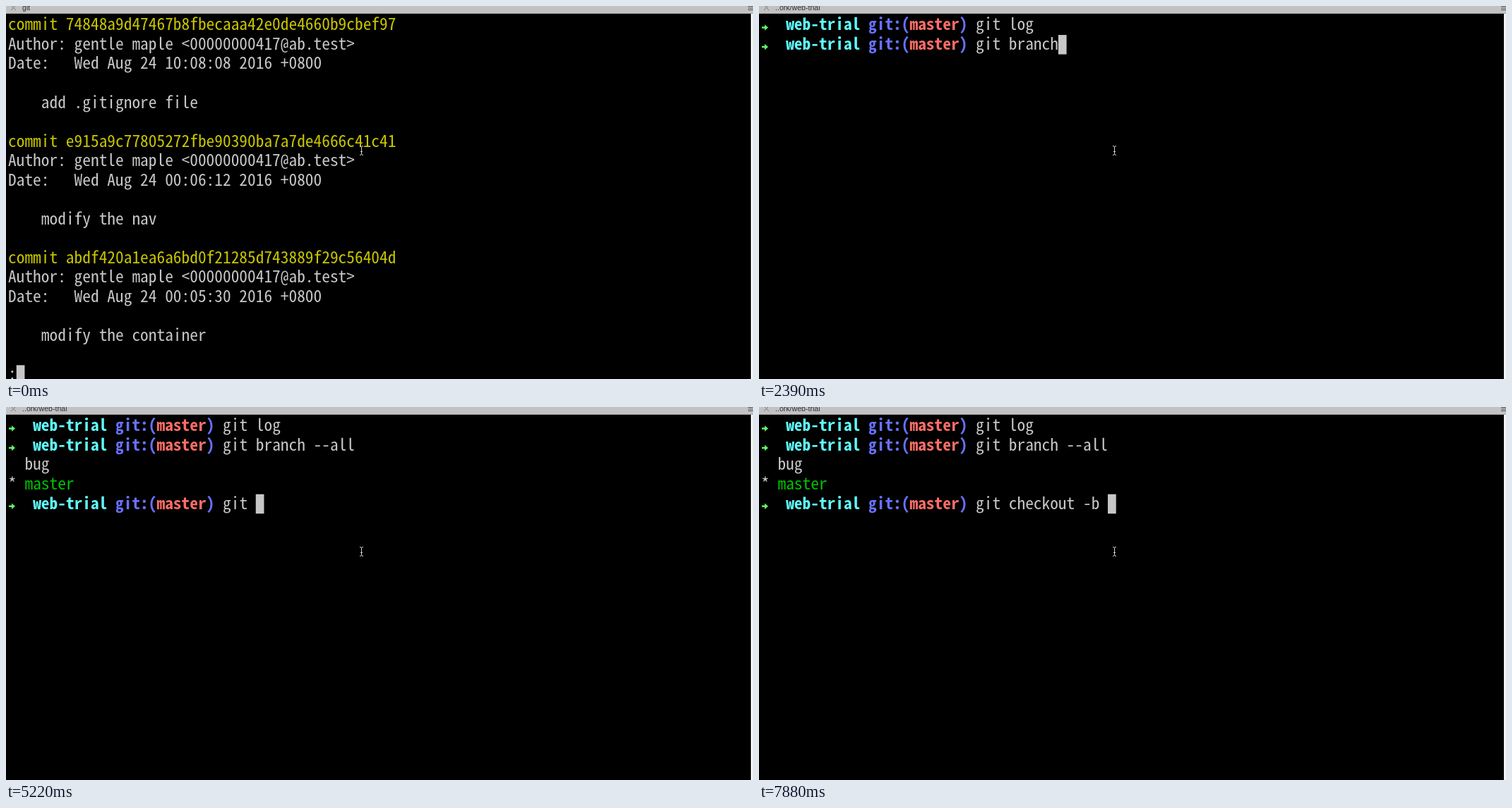
Write an HTML page that moves like this. It is 1058 px wide and 529 px high and loops after 8000 ms.

```html
<!DOCTYPE html>
<html lang="en">
<head>
<meta charset="utf-8">
<title>Terminal</title>
<style>
  html, body { margin: 0; width: 100%; height: 100%; overflow: hidden; background: #000; }
  svg { display: block; width: 100vw; height: 100vh; }
  text { white-space: pre; }
  .mono {
    font: 23.38px "Noto Sans Mono CJK SC", "Noto Sans Mono CJK JP", "Noto Sans Mono", monospace;
    fill: #c7c7c7;
  }
  .bar { font: 10.6px "Liberation Sans", Arial, sans-serif; fill: #333; }
  .bold { font-weight: 700; }
</style>
</head>
<body>
<svg id="stage" viewBox="0 0 1058 529" xmlns="http://www.w3.org/2000/svg">
  <rect width="1058" height="529"/>
  <g id="log"></g>
  <g id="shell"></g>
  <rect id="cursor" width="11.7" height="27.5" fill="#c7c7c7"/>
  <path d="M501 198.5q2.5 0 2.5 2v9q0 2 -2.5 2M506 198.5q-2.5 0 -2.5 2v9q0 2 2.5 2M502 206.5h3"
        fill="none" stroke="#d0d0d0"/>
  <rect x="1055" y="10" width="3" height="519" fill="#f4f4f4"/>
  <rect width="1058" height="11" fill="#c2c2c2"/>
  <rect y="10" width="1058" height="1" fill="#a6a6a6"/>
  <path d="M7 -1l7 7M14 -1l-7 7" stroke="#777" fill="none"/>
  <path d="M1051 .5h7M1051 3h7M1051 5.5h7" stroke="#555" fill="none"/>
  <text id="title" class="bar" x="23" y="6"></text>
</svg>
<script>
const NS = "http://www.w3.org/2000/svg";
const LOOP = 8000, CELL = 11.69, LINE = 27.55, LEFT = 3.06, TOP = 13.5, BASE = 20.8;
const GREY = "#c7c7c7", YELLOW = "#c7c400", GREEN = "#00c200", LIME = "#5ffa68",
      CYAN = "#60fdff", BLUE = "#6871ff", RED = "#ff6e67";
const PROJECT = "web-trial";
const byId = id => document.getElementById(id);
const [log, shell, cursor, title] = ["log", "shell", "cursor", "title"].map(byId);
const colX = col => LEFT + col * CELL;
const rowY = row => TOP + row * LINE;

function add(parent, name, attrs) {
  const node = document.createElementNS(NS, name);
  for (const key in attrs) node.setAttribute(key, attrs[key]);
  return parent.appendChild(node);
}

// Fit the font's advance to the terminal grid.
const probe = add(shell, "text", { class: "mono" });
probe.textContent = "0".repeat(20);
const spacing = CELL - probe.getComputedTextLength() / 20;
probe.remove();

function write(parent, row, col, text, color = GREY, bold = false) {
  const node = add(parent, "text", {
    x: colX(col), y: rowY(row) + BASE, class: bold ? "mono bold" : "mono",
    style: `fill:${color};letter-spacing:${spacing}px`
  });
  node.textContent = text;
  return node;
}

function prompt(row, command = "") {
  const g = add(shell, "g", {});
  add(g, "path", {
    d: "M4 -1.2h4v-3l5 4.2l-5 4.2v-3h-4z", fill: LIME,
    transform: `translate(0 ${rowY(row) + 17})`
  });
  write(g, row, 3, PROJECT, CYAN, true);
  write(g, row, 13, "git:(", BLUE, true);
  write(g, row, 18, "master", RED, true);
  write(g, row, 24, ")", BLUE, true);
  return { group: g, input: write(g, row, 26, command) };
}

const commits = [
  ["74848a9d47467b8fbecaaa42e0de4660b9cbef97", "10:08:08", "add .gitignore file"],
  ["e915a9c77805272fbe90390ba7a7de4666c41c41", "00:06:12", "modify the nav"],
  ["abdf420a1ea6a6bd0f21285d743889f29c56404d", "00:05:30", "modify the container"]
];
commits.forEach(([hash, time, message], i) => {
  const row = i * 6;
  write(log, row, 0, "commit " + hash, YELLOW);
  write(log, row + 1, 0, "Author: gentle maple <00000000417@ab.test>");
  write(log, row + 2, 0, `Date:   Wed Aug 24 ${time} 2016 +0800`);
  write(log, row + 4, 4, message);
});
write(log, 18, 0, ":");

prompt(0, "git log");
const second = prompt(1);
const output = add(shell, "g", {});
write(output, 2, 2, "bug");
write(output, 3, 0, "*");
write(output, 3, 2, "master", GREEN);
const third = prompt(4);

// Bursts of typing: start, interval, steps, text.
const branchKeys = [[1490, 150, 7, "git branch"], [2840, 150, 6, " --all"]];
const checkoutKeys = [[4930, 145, 3, "git "], [5670, 145, 7, "checkout "], [7590, 145, 3, "-b "]];

const typed = (t, bursts) => bursts.map(([start, gap, steps, text]) => {
  const step = Math.max(0, Math.min(steps, Math.floor((t - start) / gap) + 1));
  return text.slice(0, Math.round(step / steps * text.length));
}).join("");

const show = (node, on) => node.setAttribute("visibility", on ? "visible" : "hidden");

function draw(t) {
  const paging = t < 300, listed = t >= 3740, ready = t >= 3890;
  const busy = t < 450 || (listed && !ready);
  const branch = typed(t, branchKeys), checkout = typed(t, checkoutKeys);
  show(log, paging);
  show(shell, !paging);
  second.group.style.display = t < 450 ? "none" : "";
  output.style.display = listed ? "" : "none";
  third.group.style.display = ready ? "" : "none";
  second.input.textContent = branch;
  third.input.textContent = checkout;
  title.textContent = busy ? "git" : "..ork/" + PROJECT;

  const [row, col] = paging ? [18, 1] : ready ? [4, 26 + checkout.length] : [1, 26 + branch.length];
  cursor.setAttribute("x", colX(col));
  cursor.setAttribute("y", rowY(row));
  show(cursor, paging || !busy);
}

const begin = performance.now();
function tick() {
  draw((performance.now() - begin) % LOOP);
  requestAnimationFrame(tick);
}
tick();
</script>
</body>
</html>
```
